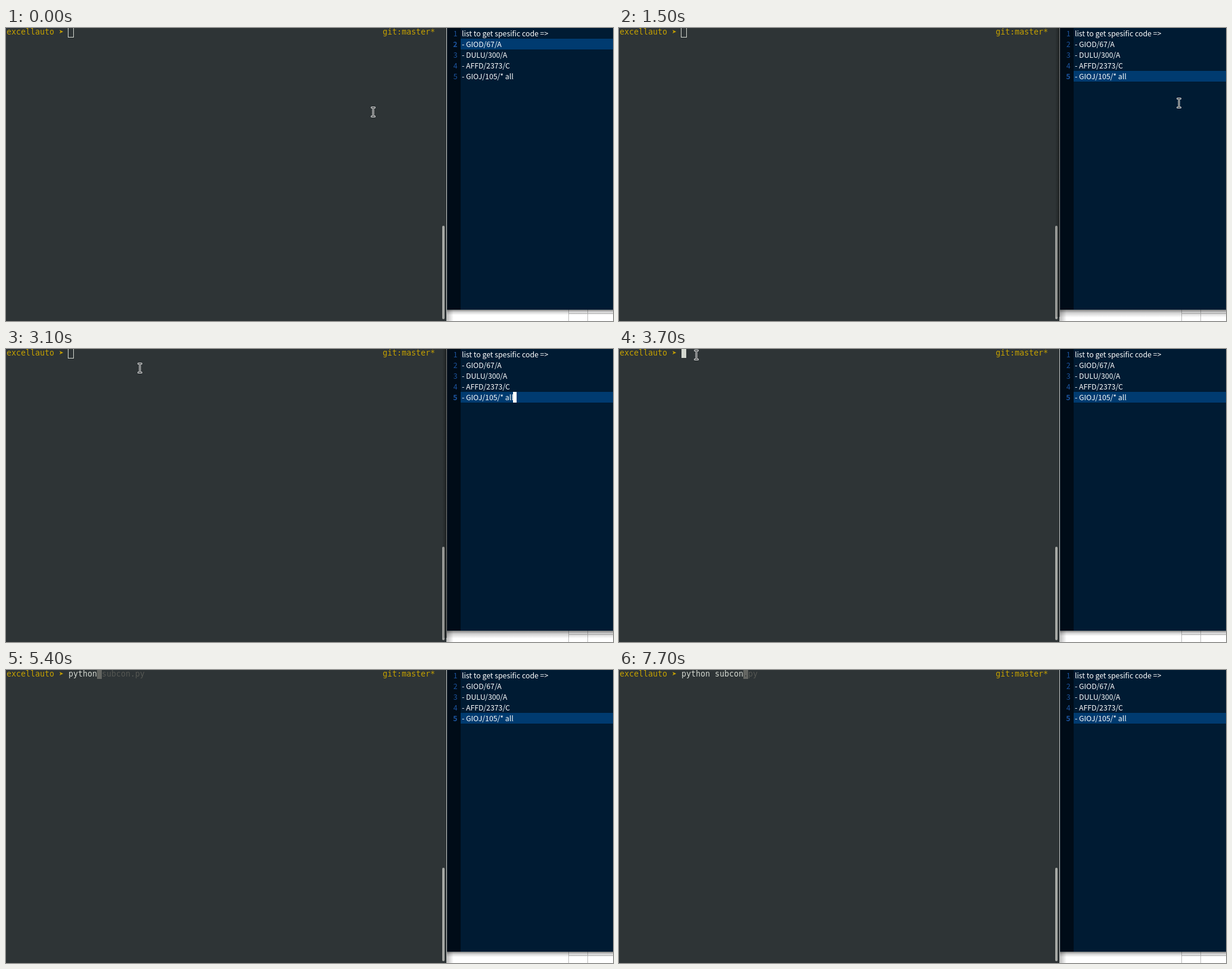
Recreate the animation shown at these times as an HTML page. Size 1020x492 px, loop 8 s.

```html
<!DOCTYPE html>
<html lang="en">
<head>
<meta charset="utf-8">
<title>Terminal and list</title>
<style>
  html, body { margin: 0; width: 100%; height: 100%; overflow: hidden; background: #2e3436; }
  svg { display: block; width: 1020px; height: 492px; }
  text { white-space: pre; }
  .mono { font: 13.29px "DejaVu Sans Mono", monospace; }
  .sans { font: 12.3px "Noto Sans CJK JP", "Noto Sans CJK SC", "Noto Sans CJK", "Noto Sans", sans-serif; }
</style>
</head>
<body>
<svg viewBox="0 0 1020 492">
  <defs>
    <linearGradient id="below" x2="0" y2="1">
      <stop offset="0" stop-opacity=".5"/>
      <stop offset=".4" stop-opacity=".18"/>
      <stop offset="1" stop-opacity="0"/>
    </linearGradient>
    <linearGradient id="beside">
      <stop offset="0" stop-opacity="0"/>
      <stop offset="1" stop-opacity=".4"/>
    </linearGradient>
    <linearGradient id="edge">
      <stop offset="0" stop-opacity=".25"/>
      <stop offset="1" stop-opacity="0"/>
    </linearGradient>
    <path id="beam" d="M-2.5-7.5H2.5M0-7.5V7.5M-2.5 7.5H2.5"/>
  </defs>

  <rect width="740" height="492" fill="#2e3436"/>
  <rect x="733" y="332" width="4" height="157" rx="2" fill="#a6a8a5"/>
  <g class="mono" fill="#c4a000">
    <text x="1" y="11">excellauto ➤</text>
    <text x="633" y="11">git:master*</text>
  </g>
  <rect id="hollow" x="104.5" y="-1.5" width="9" height="17" fill="none" stroke="#d3d7cf"/>
  <rect id="block" y="0" width="8" height="15"/>
  <g class="mono">
    <text id="typed" x="105" y="11" fill="#d3d7cf"></text>
    <text id="under" y="11" fill="#3a3f40"></text>
    <text id="hint" y="11" fill="#555753"></text>
  </g>

  <rect x="741" y="473" width="279" height="19" fill="#fff"/>
  <path d="M945.5 473V492M977.5 473V492M945 479.5H1020" stroke="#bcbcbc" fill="none"/>
  <rect id="bottomShade" x="741" y="473" width="279" fill="url(#below)"/>
  <rect x="741" y="473" width="11" height="19" fill="url(#edge)"/>
  <rect x="740" width="1" height="492" fill="#c9cbca"/>
  <rect id="sideShade" x="733" width="8" height="485" fill="url(#beside)"/>
  <rect x="741" width="23" height="473" fill="#000c18"/>
  <rect x="764" width="256" height="473" fill="#001b33"/>
  <rect id="row" x="764" width="256" height="18" fill="#003b70"/>
  <g id="list" class="sans"></g>
  <rect id="caret" x="852" y="72" width="6" height="18" fill="#fff"/>

  <g id="mouse" fill="none" stroke-linecap="round">
    <use href="#beam" stroke="#e8e8e8" stroke-width="3"/>
    <use href="#beam" stroke="#222628"/>
  </g>
</svg>
<script>
const LOOP = 8000, STEP = 100, CELL = 8, LEFT = 105;
const EDITOR_FOCUS = 900, TERMINAL_FOCUS = 3700, BLINK_OFF = 4300, TYPING = 4500, FIXING = 6900;
const COMMAND = "python subcon.py";
const TYPED = "python subocn", FIXES = "<<<con"; // "<" is backspace
const LINES = ["list to get spesific code =>", "- GIOD/67/A", "- DULU/300/A", "- AFFD/2373/C", "- GIOJ/105/* all"];

// Each leg of the pointer is a curve that starts where the last one ended.
const HOME = [617, 141];
const LEGS = [
  { from: 100, to: 700, bend: [780, 318], end: [963, 87] },
  { from: 900, to: 1500, bend: [955, 115], end: [941, 126] },
  { from: 1500, to: 2300, bend: [720, 80], end: [797, 72] },
  { from: 2300, to: 2600, bend: [840, 74], end: [890, 88] },
  { from: 2700, to: 3500, bend: [-60, 15], end: [130, 10] }
];

const $ = id => document.getElementById(id);
const set = (el, attrs) => { for (const k in attrs) el.setAttribute(k, attrs[k]); };
const show = (id, on) => set($(id), { visibility: on ? "visible" : "hidden" });
const clamp = k => Math.max(0, Math.min(1, k));
const smooth = k => k * k * (3 - 2 * k);

function addText(x, y, content, attrs) {
  const el = document.createElementNS("http://www.w3.org/2000/svg", "text");
  set(el, { x, y, ...attrs });
  el.textContent = content;
  $("list").append(el);
  return el;
}

const numbers = LINES.map((line, i) => {
  const y = 14 + i * 18;
  addText(766, y, line, { fill: "#fff" });
  return addText(758.5, y, i + 1, { fill: "#1c549e", "text-anchor": "end" });
});

function mouseAt(t) {
  return LEGS.reduce((start, { from, to, bend, end }) => {
    const k = smooth(clamp((t - from) / (to - from))), r = 1 - k;
    return start.map((s, i) => r * r * s + 2 * r * k * bend[i] + k * k * end[i]);
  }, HOME).map(Math.round);
}

// Keys come at a steady pace, slightly faster while correcting.
function typedAt(t) {
  const strokes = (keys, begin, pace) => keys.slice(0, Math.max(0, Math.floor((t - begin) / pace) + 1));
  const keys = strokes(TYPED, TYPING, 175) + strokes(FIXES, FIXING, 160);
  return [...keys].reduce((text, key) => key === "<" ? text.slice(0, -1) : text + key, "");
}

function drawEditor(t) {
  const focused = t >= EDITOR_FOCUS && t < TERMINAL_FOCUS;
  const current = t < EDITOR_FOCUS ? 1 : 4;
  set($("row"), { y: current * 18 });
  numbers.forEach((el, i) => set(el, { "font-weight": i === current ? 700 : 400 }));
  show("caret", focused && (t - EDITOR_FOCUS) % 1000 < 500);
  show("sideShade", focused);
  set($("bottomShade"), { height: focused ? 13 : 9 });
}

function drawTerminal(t) {
  const typed = typedAt(t);
  const rest = typed && COMMAND.startsWith(typed) ? COMMAND.slice(typed.length) : "";
  const x = LEFT + typed.length * CELL;
  show("hollow", t < TERMINAL_FOCUS);
  show("block", t >= TERMINAL_FOCUS && !(t >= BLINK_OFF && t < TYPING));
  set($("block"), { x, fill: rest ? "#646662" : "#d3d7cf" });
  $("typed").textContent = typed;
  $("under").textContent = rest.slice(0, 1);
  $("hint").textContent = rest.slice(1);
  set($("under"), { x });
  set($("hint"), { x: x + CELL });
}

function draw(t) {
  drawEditor(t);
  drawTerminal(t);
  show("mouse", t < TYPING);
  set($("mouse"), { transform: `translate(${mouseAt(t)})` });
}

const start = performance.now();
function tick() {
  const t = (performance.now() - start) % LOOP;
  draw(Math.floor(t / STEP) * STEP);
  requestAnimationFrame(tick);
}
tick();
</script>
</body>
</html>
```
